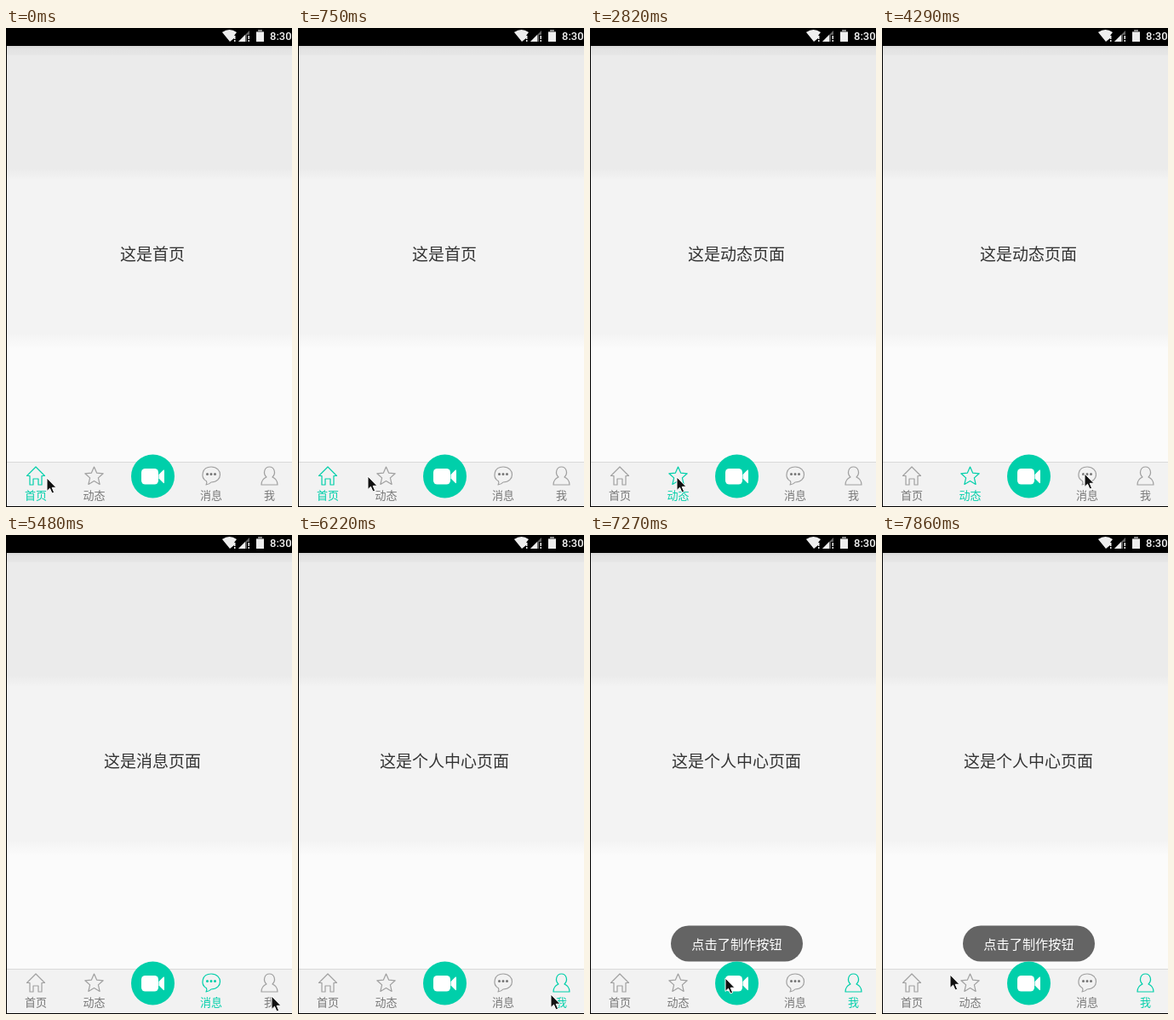
These frames come from a looping animation (336 px wide and 561 px high, 8 s). An HTML page:

```html
<!DOCTYPE html>
<html lang="zh-CN">
<head>
<meta charset="utf-8">
<style>
  html, body { margin: 0; width: 100%; height: 100%; overflow: hidden; background: #000; }
  svg { display: block; width: 336px; height: 561px; }
  text { font-family: "Noto Sans CJK SC", "Noto Sans CJK", sans-serif; text-anchor: middle; }
  .clock { font: 500 13px Roboto, sans-serif; text-anchor: start; fill: #f4f4f4; }
  .tab { --line: #a0a0a0; --label: #777; }
  .tab.on { --line: #00cfaa; --label: #00cfaa; }
  .tab path { fill: none; stroke: var(--line); stroke-width: 1.2; stroke-linejoin: round; }
  .tab .dots { stroke: var(--label); stroke-width: 3; stroke-linecap: round; }
  .tab text { font-size: 13px; fill: var(--label); }
</style>
</head>
<body>
<svg viewBox="0 0 336 561">
  <defs>
    <linearGradient id="sky" gradientUnits="userSpaceOnUse" x1="0" y1="21" x2="0" y2="508">
      <stop offset="0" stop-color="#d9d9d9"/>
      <stop offset=".008" stop-color="#e3e3e3"/>
      <stop offset=".021" stop-color="#e6e6e6"/>
      <stop offset=".023" stop-color="#ebebeb"/>
      <stop offset=".295" stop-color="#ebebeb"/>
      <stop offset=".322" stop-color="#f3f3f3"/>
      <stop offset=".69" stop-color="#f3f3f3"/>
      <stop offset=".728" stop-color="#fbfbfb"/>
    </linearGradient>
  </defs>
  <rect width="336" height="561"/>
  <rect x="1" y="21" width="335" height="488" fill="url(#sky)"/>
  <rect x="1" y="508" width="335" height="52" fill="#f2f2f2"/>
  <rect x="1" y="508" width="335" height="1" fill="#d9d9d9"/>

  <g fill="#eee">
    <path d="M254 5Q262.500 -1 271 5L268 9V12L263 16Z"/>
    <path d="M268 9h1.500v4h-1.500zM268 14h1.500v2h-1.500z"/>
    <path d="M273 16L286 3V8H283V16Z" fill="#666"/>
    <path d="M273 16L281 8V16Z"/>
    <path d="M284.500 9h1.500v4h-1.500zM284.500 14h1.500v2h-1.500z"/>
    <path d="M294 4h2.500v-2h4v2h2.500v12h-9z"/>
    <path d="M294 4h2.500v-2h4v2h2.500v1h-9z" fill="#888"/>
  </g>
  <text class="clock" x="310" y="14">8:30</text>

  <text id="title" x="172" y="271.500" font-size="19" fill="#333"></text>
  <g id="tabs"></g>

  <g id="toast">
    <rect x="95" y="457.500" width="155" height="42" rx="21" fill="#646464"/>
    <text x="172.500" y="484.500" font-size="15.200" fill="#fff">点击了制作按钮</text>
  </g>

  <circle cx="172.500" cy="525" r="25.500" fill="#00cfaa"/>
  <rect x="159" y="516" width="20" height="18.500" rx="4.500" fill="#fff"/>
  <path d="M179.500 523L185 517.500Q186 517 186 518.500V532Q186 533.500 185 533L179.500 527.500Z" fill="#fff"/>

  <path id="cursor" d="M0 0V15.500L3.500 12.200L6 18L8.600 16.900L6.200 11.300H11Z"
        fill="#111" stroke="#fff" stroke-width="1"/>
</svg>
<script>
const LOOP = 8000, STEP = 147.5;
const $ = id => document.getElementById(id);

const star = 'M' + Array.from({ length: 10 }, (_, i) => {
  const r = i % 2 ? 5.2 : 11.3, a = i * Math.PI / 5;
  return `${(r * Math.sin(a)).toFixed(1)} ${(.8 - r * Math.cos(a)).toFixed(1)}`;
}).join('L') + 'Z';

// Icon paths are centred on (0, 0)
const tabs = [
  { x: 35, label: '首页', page: '这是首页',
    icon: 'M0 -10.500L-10.500 0H-7V10.500H-3V3.500H3V10.500H7V0H10.500Z' },
  { x: 103.5, label: '动态', page: '这是动态页面', icon: star },
  { x: 241, label: '消息', page: '这是消息页面',
    icon: 'M-5.500 6.200C-13 2 -11 -10.500 0 -10.500C14 -10.500 14 7.500 0 7.500Q-2 10 -6 10.500Q-4.500 8.500 -5.500 6.200Z',
    dots: 'M-4.500 -2h.01M0 -2h.01M4.500 -2h.01' },
  { x: 309.5, label: '我', page: '这是个人中心页面',
    icon: 'M-3.500 1.500C-8 -3 -6 -10.500 0 -10.500S8 -3 3.500 1.500C7 3 9.500 6 9.500 10.500H-9.500C-9.500 6 -7 3 -3.500 1.500Z' }
];
$('tabs').innerHTML = tabs.map(({ x, label, icon, dots }) => `
  <g class="tab" transform="translate(${x} 524.500)">
    <path d="${icon}"/>${dots ? `<path class="dots" d="${dots}"/>` : ''}
    <text y="27">${label}</text>
  </g>`).join('');
const tabNodes = [...document.querySelectorAll('.tab')];

// When each tab becomes active
const switches = [0, 2680, 4590, 5620];

// Cursor moves: start, number of held steps, end x, end y
const start = [48, 527];
const moves = [
  [150, 5, 82, 525], [900, 3, 94, 526], [1330, 1, 95, 526],
  [2380, 3, 102, 526], [3410, 7, 238, 522], [4880, 3, 319, 541],
  [5330, 2, 312, 540], [6220, 5, 168, 520], [7270, 5, 80, 515]
];
const ease = p => p * p * (3 - 2 * p);

function cursorAt(t) {
  let [x, y] = start;
  for (const [at, steps, toX, toY] of moves) {
    if (t < at) break;
    const done = Math.min(steps, Math.floor((t - at + 8) / STEP) + 1);
    const p = ease(done / steps);
    x += (toX - x) * p;
    y += (toY - y) * p;
  }
  return [Math.round(x), Math.round(y)];
}

let active = -1;
function showTab(index) {
  if (index === active) return;
  active = index;
  $('title').textContent = tabs[index].page;
  tabNodes.forEach((node, i) => node.classList.toggle('on', i === index));
}

const origin = performance.now();
function draw() {
  const t = (performance.now() - origin) % LOOP;
  showTab(switches.filter(at => at <= t).length - 1);
  $('cursor').setAttribute('transform', `translate(${cursorAt(t).join(' ')})`);
  $('toast').setAttribute('opacity', t < 7120 ? 0 : t < 7270 ? .5 : 1);
  requestAnimationFrame(draw);
}
draw();
</script>
</body>
</html>
```
